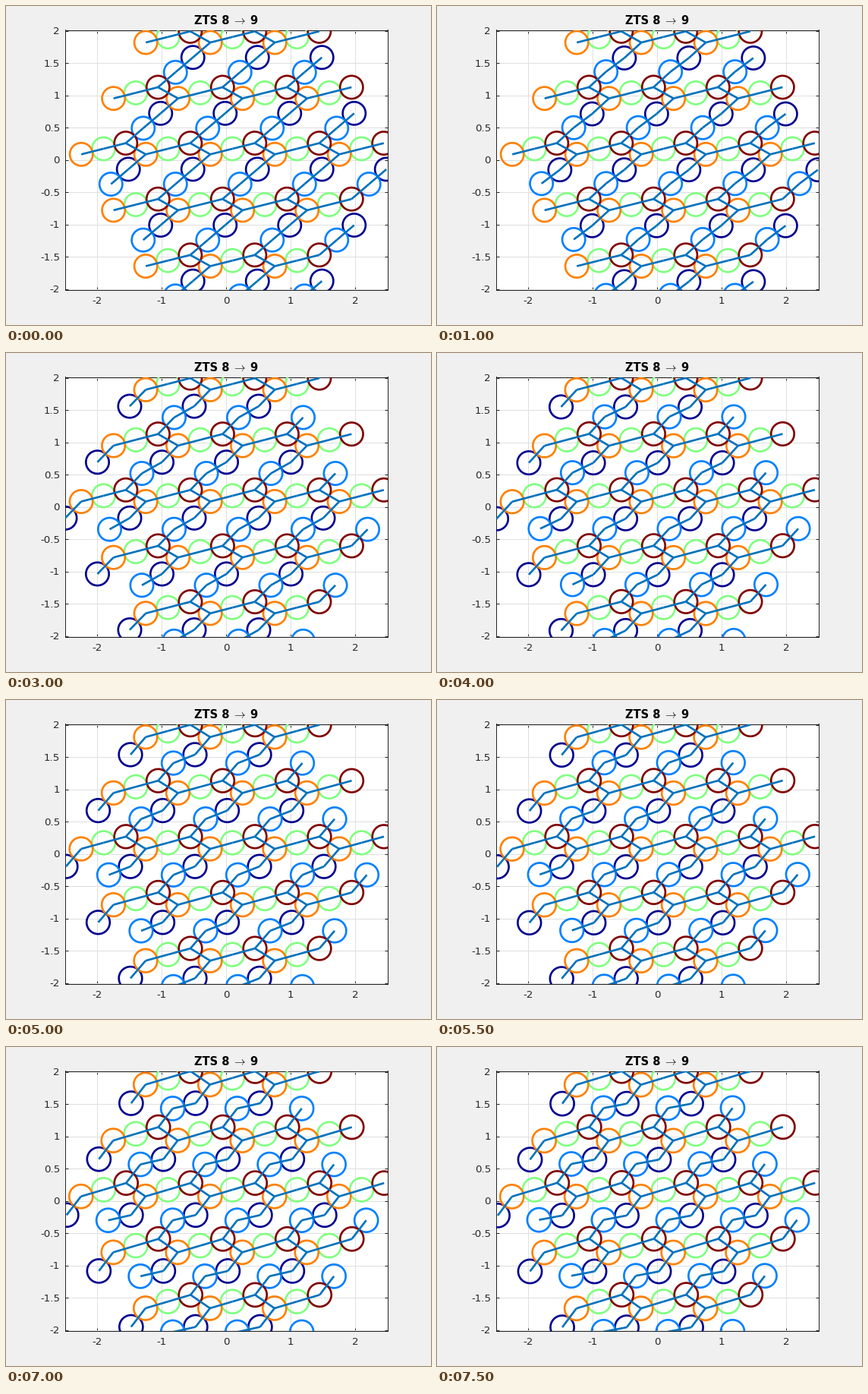
A matplotlib script that plays this animation: 560x420 px, repeating every 8000 ms.

```python
import numpy as np
import matplotlib.pyplot as plt
from matplotlib.animation import FuncAnimation
from matplotlib.collections import LineCollection, PolyCollection

W, H, DPI = 560, 420, 100
PT = 72 / DPI                      # points per pixel
LEFT, RIGHT, TOP, BOTTOM = 77.5, 502.5, 31.5, 373.5
X0, Y0, UNIT = 290, 202.65, 85     # data origin and scale in pixels
FRAMES, INTERVAL = 16, 500
INK = "#262626"

A1 = np.array([1, 0])
A2 = np.array([0.5, np.sqrt(3) / 2])
CELLS = np.array([i * A1 + j * A2
                  for j in range(-2, 3) for i in range(-2, 3) if abs(i + j) <= 2])
CENTER = A2 / 5
COLORS = [(0, 0, 0.5625), (0, 0.5, 1), (0.5, 1, 0.5), (1, 0.5, 0), (0.5, 0, 0)]
LINKS = [(0, 1), (0, 3), (1, 4), (2, 3), (2, 4), (3, 4)]
TURN = np.linspace(0, 2 * np.pi, 73)
CIRCLE = np.column_stack([np.cos(TURN), np.sin(TURN)])

plt.rcParams.update({"font.family": "DejaVu Sans", "mathtext.fontset": "cm"})


def polar(r, a):
    return r * np.array([np.cos(a), np.sin(a)])


def unit_cell(t):
    """Five touching discs and their contact distance at time t (seconds)."""
    phi = np.radians(29.133 + 6.2 * (t / 7.5) ** 2)
    theta = np.arcsin(np.sin(phi) / 2)
    d = 1 / (2 * np.cos(theta) + np.cos(phi))
    half = polar(d, theta)
    # three equal links from the dark red disc up to the next row's orange disc
    span = polar(d, -phi) + A2
    s = np.hypot(*span)
    bend = np.arccos(min(1, (s * s + 3 * d * d) / (4 * s * d)))
    step = polar(d, np.arctan2(span[1], span[0]) + bend)
    orange, red = CENTER - half, CENTER + half
    navy = orange - step + (A1 if t < 2 else 0)   # wraps to the next cell
    return np.array([navy, red - A2 + step, CENTER, orange, red]), d


def label(x, y, s, px, **kw):
    return fig.text(x / W, 1 - y / H, s, fontsize=px * PT, va="baseline", **kw)


fig = plt.figure(figsize=(W / DPI, H / DPI), dpi=DPI, facecolor="#f0f0f0")
ax = fig.add_axes([LEFT / W, 1 - BOTTOM / H, (RIGHT - LEFT) / W, (BOTTOM - TOP) / H])
ax.set_xlim((LEFT - X0) / UNIT, (RIGHT - X0) / UNIT)
ax.set_ylim((Y0 - BOTTOM) / UNIT, (Y0 - TOP) / UNIT)
ax.set_xticks(range(-2, 3))
ax.set_yticks(np.arange(-2, 2.1, 0.5))
ax.set_axisbelow(True)
ax.grid(color="#dfdfdf", lw=PT)
ax.tick_params(direction="in", length=4.25 * PT, width=PT, color=INK,
               top=True, right=True, labelbottom=False, labelleft=False)
for spine in ax.spines.values():
    spine.set(color=INK, linewidth=PT)

for v in ax.get_xticks():
    label(X0 + v * UNIT, 392, f"{v:g}", 13.33, ha="center", color=INK)
for v in ax.get_yticks():
    label(71, Y0 - v * UNIT + 4.8, f"{v:g}", 13.33, ha="right", color=INK)
label(248, 24, "ZTS 8", 14.67, ha="left", weight="bold")
label(307.5, 24, r"$\rightarrow$", 14.67, ha="center")
label(331, 24, "9", 14.67, ha="right", weight="bold")

discs = PolyCollection([], facecolors="none", linewidths=2.67 * PT, zorder=3,
                       edgecolors=np.repeat(COLORS, len(CELLS), axis=0))
bonds = LineCollection([], colors=[(0, 0.447, 0.741)], linewidths=2.67 * PT, zorder=4)
ax.add_collection(discs, autolim=False)
ax.add_collection(bonds, autolim=False)


def update(i):
    cell, d = unit_cell(i * INTERVAL / 1000)
    pos = cell[:, None] + CELLS
    discs.set_verts(list(pos.reshape(-1, 1, 2) + d / 2 * CIRCLE))
    bonds.set_segments([(p, q) for a, b in LINKS for p in pos[a] for q in pos[b]
                        if np.hypot(*(p - q)) < 1.05 * d])
    return discs, bonds


anim = FuncAnimation(fig, update, frames=FRAMES, interval=INTERVAL,
                     repeat=True, repeat_delay=0, blit=False)
plt.show()
```
